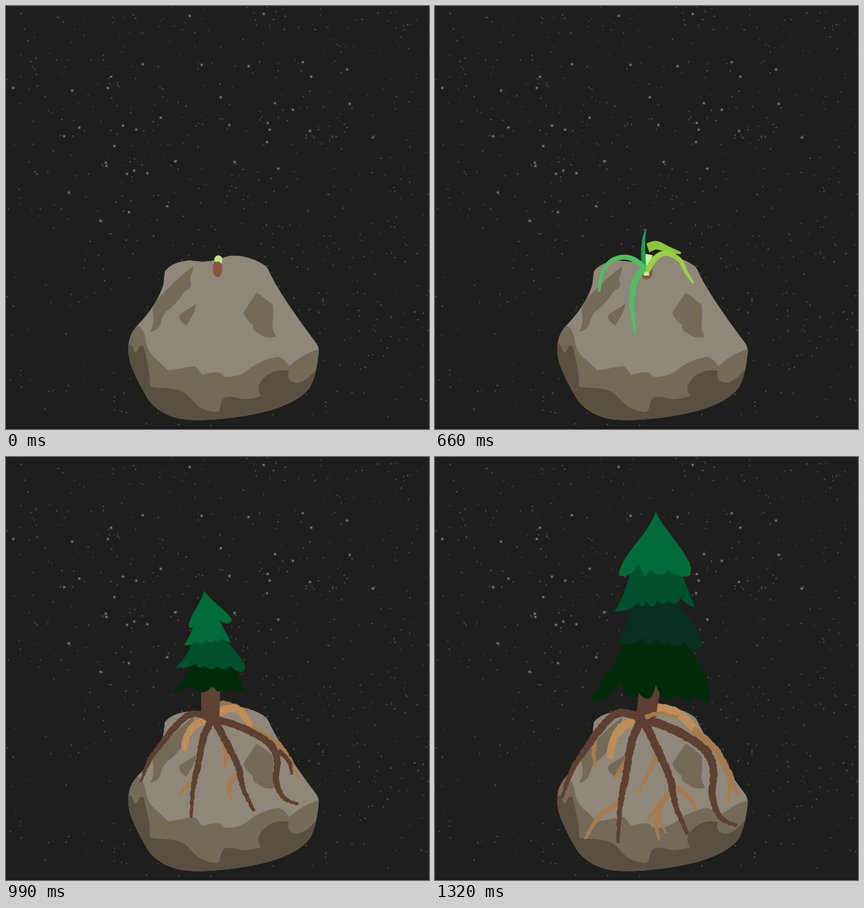
Write an HTML page with a canvas that moves like this. It is 640 px wide and 640 px high and loops after 2930 ms.

```html
<!DOCTYPE html>
<html lang="en">
<head>
<meta charset="utf-8">
<title>Tree growing on a rock</title>
<style>
html, body { margin: 0; height: 100%; overflow: hidden; background: #1e1e1d; }
canvas { display: block; width: 100vw; height: 100vh; }
</style>
</head>
<body>
<canvas id="stage" width="640" height="640"></canvas>
<script>
const stage = document.getElementById('stage');
const ctx = stage.getContext('2d');
const LOOP = 2930;

function seeded(seed) {
  return () => (seed = seed * 16807 % 2147483647) / 2147483647;
}

function fill(g, color, d) {
  g.fillStyle = color;
  g.fill(new Path2D(d));
}

// ---------- still backdrop ----------
const brightStars = [
  207,88, 100,128, 154,124, 159,107, 88,197, 111,184, 177,181, 197,187, 164,212, 151,237,
  152,242, 194,249, 214,253, 256,235, 183,254, 95,282, 143,325, 186,312, 244,303, 325,138,
  338,180, 346,236, 296,89, 367,91, 407,147, 434,157, 399,187, 395,206, 396,177, 460,189,
  449,85, 462,107, 516,96, 520,148, 555,199, 412,246, 390,12, 11,124, 234,169, 278,15
];

function dot(g, x, y, r, alpha) {
  g.fillStyle = `rgba(205,205,205,${alpha})`;
  g.beginPath();
  g.arc(x, y, r, 0, 7);
  g.fill();
}

function drawStars(g) {
  const rnd = seeded(4711);
  for (let i = 0; i < 900; i++) {
    const x = rnd() * 640, y = rnd() * 636;
    const light = rnd(), keep = rnd();
    const density = y > 500 ? .4 : x > 370 ? .95 : y < 340 ? .75 : .5;
    if (keep > density) continue;
    dot(g, x, y, 1.7, .03 + light * .08);
    dot(g, x, y, .9, .1 + light * .18);
  }
  for (let i = 0; i < brightStars.length; i += 2) {
    const x = brightStars[i], y = brightStars[i + 1];
    dot(g, x, y, 3.2, .07);
    dot(g, x, y, 2, .22);
    dot(g, x, y, 1.1, .5);
  }
}

function drawRock(g) {
  const outline = `M240 402C246 392 262 385 280 385C300 388 315 386 330 380
    C345 374 370 379 388 390C398 396 398 402 402 409C415 435 440 470 468 508
    C473 514 474 520 473 525C471 545 468 560 461 575C450 592 425 605 395 613
    C360 622 310 628 275 626C250 624 228 613 215 595C203 575 194 557 188 540
    C184 525 184 512 188 500C193 488 200 482 207 474C220 460 235 435 238 420Z`;
  const mid = '#736a58';
  g.save();
  g.clip(new Path2D(outline));
  fill(g, '#8f877a', outline);
  fill(g, mid, `M180 484L195 484C202 482 208 490 211 502C212 515 216 525 228 535
    C235 541 240 546 245 551C255 551 270 546 286 545C292 550 294 556 297 558
    C305 556 315 553 325 555C327 560 330 561 338 561C352 560 362 555 372 546
    C385 538 400 532 412 531C420 532 425 540 429 545C438 536 455 524 474 519L480 640H180Z`);
  fill(g, '#5a5042', `M180 513H185C189 510 192 515 193 521C195 526 199 525 201 517
    C204 512 208 513 209 518C212 530 214 540 216 550C218 560 217 570 219 576
    C235 579 255 577 268 584C280 592 285 605 302 611C312 615 320 615 323 612
    C325 603 326 594 332 592C340 590 350 593 358 595C370 595 380 592 386 590
    C378 580 382 570 393 560C405 551 415 550 428 552C425 562 428 569 440 570
    C450 569 460 561 470 549L480 640H180Z`);
  fill(g, mid, `M284 394C270 402 255 418 237 435C228 445 222 450 222 460
    C224 475 224 485 218 492C225 493 231 488 234 480C236 470 240 463 248 458
    C258 450 265 440 270 432C278 427 281 425 280 420C276 412 282 405 284 394Z`);
  fill(g, mid, `M288 450C280 458 262 464 262 470C262 476 268 480 273 484
    C278 474 286 465 288 450Z`);
  fill(g, mid, `M379 434C372 445 364 455 359 465C364 475 370 480 374 483
    C372 490 378 493 382 495C390 502 398 503 409 500C404 494 402 485 404 475
    C405 465 404 455 403 451C395 446 388 438 379 434Z`);
  g.restore();
}

const backdrop = document.createElement('canvas');
backdrop.width = backdrop.height = 640;
const back = backdrop.getContext('2d');
back.fillStyle = '#1e1e1d';
back.fillRect(0, 0, 640, 640);
drawStars(back);
back.fillStyle = '#1a1a19';
back.fillRect(0, 637, 640, 3);
drawRock(back);

// ---------- tapered leaves and roots ----------
function spline(a, b, c, d, t) {
  return b + .5 * t * (c - a + t * (2 * a - 5 * b + 4 * c - d + t * (3 * (b - c) + d - a)));
}

function limb(color, w0, w1, text, grow = 1, rough = 0) {
  const p = text.split(' ').map(s => s.split(',').map(Number));
  const last = p.length - 1, n = last * 14, rnd = seeded(97);
  const at = u => {
    const i = Math.min(last - 1, Math.floor(u * last)), t = u * last - i;
    const q = [p[Math.max(0, i - 1)], p[i], p[i + 1], p[Math.min(last, i + 2)]];
    return [0, 1].map(k => spline(q[0][k], q[1][k], q[2][k], q[3][k], t));
  };
  const left = [], right = [];
  for (let i = 0; i <= n; i++) {
    const u = i / n * grow, s = i / n;
    const [x, y] = at(u), [ax, ay] = at(Math.max(0, u - .01)), [bx, by] = at(Math.min(1, u + .01));
    const len = Math.hypot(bx - ax, by - ay) || 1;
    const nx = (ay - by) / len, ny = (bx - ax) / len;
    const w = (w0 + (w1 - w0) * s * s) / 2;
    const l = w + (rnd() - .5) * rough, r = w + (rnd() - .5) * rough;
    left.push([x + nx * l, y + ny * l]);
    right.unshift([x - nx * r, y - ny * r]);
  }
  ctx.fillStyle = color;
  ctx.beginPath();
  left.concat(right).forEach(v => ctx.lineTo(...v));
  ctx.fill();
}

const root = (color, w0, w1, text) => limb(color, w0, w1, text, 1, 1.8);
const shape = (color, d) => fill(ctx, color, d);

const LIME = '#9bd046', LEAF = '#8cc63f', PALE = '#cdeea0', GREEN = '#52bd63';
const TAN = '#bd8d5a', LIGHT = '#a67a4e', BROWN = '#8d643e', BARK = '#5d4031';
const FIR = ['#006b3a', '#004f2d', '#07301f', '#002a0a'];

// ---------- growth stages ----------
function seed() {
  shape('#8b5344', 'M313 396C313 388 317 385 321 385C326 386 328 392 327 400C326 407 323 411 319 410C315 409 313 404 313 396Z');
}

function nub() {
  seed();
  shape('#c0e68a', 'M315 384C316 378 320 376 324 378C328 380 328 386 326 390L321 386C319 388 316 388 315 384Z');
}

function husk() {
  shape('#8b5344', 'M312 402C312 393 318 389 323 391C330 394 331 404 327 410C323 415 315 415 313 409Z');
}

function sprout(grow = 1) {
  husk();
  limb(LEAF, 8, 7, '312,361 320,364 334,376', grow);
  limb(LIME, 8, 2, '318,402 304,381 288,373 276,381 268,396', grow);
  limb(LIME, 9, 2, '322,398 335,381 350,372 363,368', grow);
  limb('#3fae5c', 8, 7, '322,388 323,375 325,359', grow);
  limb(PALE, 8, 11, '320,408 320,398 322,385');
}

function leaves() {
  husk();
  limb(LEAF, 14, 3, '322,366 335,362 352,368 372,374');
  limb(PALE, 8, 11, '320,408 320,398 324,376');
  limb(LIME, 9, 3, '320,402 333,382 350,374 370,384 380,403 391,419');
  limb('#1f9d55', 7, 1, '316,396 315,372 316,352 319,337');
  limb(GREEN, 8, 4, '318,398 302,384 284,380 265,387 253,405 248,432');
  limb(GREEN, 10, 3, '317,396 303,415 298,440 299,465 303,496');
}

function sapling() {
  limb(LIME, 7, 3, '323,378 332,369 350,374 372,380');
  limb(PALE, 7, 4, '326,396 326,413');
  root(TAN, 12, 5, '318,398 330,383 350,377 366,390 380,416 418,431');
  root(TAN, 11, 4, '314,396 286,385 260,400 236,436 201,474');
  root(BROWN, 13, 3, '314,396 301,425 297,480 293,556');
  root(BROWN, 12, 5, '320,396 365,414 405,445 425,478 429,508');
  root(BARK, 13, 3, '317,390 322,430 343,470 359,516');
  shape(BARK, 'M311 362L316 355L324 362L323 400H312Z');
  shape('#004d2c', `M300 295L327 292C332 300 345 312 348 322C349 328 347 331 343 329
    C347 340 354 352 354 364C350 368 342 366 337 362C332 369 326 368 321 362
    C318 357 314 353 311 360C306 364 302 364 299 359C296 363 291 362 291 355
    C283 360 276 366 268 367C278 355 286 340 294 325C290 327 287 327 287 323
    C292 315 300 305 300 295Z`);
  shape(FIR[0], `M316 232C320 240 332 255 341 272C341 278 337 278 332 278
    C334 286 339 293 342 298C336 298 330 295 327 292C326 298 322 300 318 298
    C316 301 310 301 307 298C303 301 299 300 297 297C293 302 289 303 286 302
    C290 295 293 285 296 277C292 278 289 278 289 274C296 260 308 250 316 232Z`);
}

function darkRoots() {
  root(BARK, 13, 4, '312,394 280,387 256,404 228,442 207,475 192,516');
  root(BARK, 13, 4, '313,395 298,430 289,480 280,530 277,584');
  root(BARK, 13, 5, '314,396 334,437 355,485 365,530 383,571');
  root(BARK, 14, 5, '314,396 360,412 405,440 421,470 420,515 433,546 457,558');
}

function youngTree() {
  root('#9c7147', 16, 3, '314,385 328,370 346,372 372,382');
  root(TAN, 17, 10, '313,394 332,380 356,379 378,411');
  root(LIGHT, 10, 3, '376,412 418,439 440,468 459,514');
  root(TAN, 14, 8, '303,397 281,411 268,434 265,457');
  root(LIGHT, 9, 3, '334,448 335,474 331,494');
  root(LIGHT, 10, 4, '282,515 266,526 257,545');
  root(LIGHT, 11, 3, '354,500 341,523 344,551');
  darkRoots();
  root(BARK, 9, 4, '423,456 441,477 446,502');
  shape('#5d4334', 'M293 338L326 336L324 398L308 404L294 395Z');
  shape(FIR[3], `M274 292L345 290C352 312 362 328 368 346C360 347 350 342 344 337
    C342 346 334 348 328 342C323 348 318 345 313 332C308 340 304 346 300 345
    C297 348 293 346 290 343C284 346 280 342 278 332C270 338 258 346 246 346
    C258 330 272 310 274 292Z`);
  shape(FIR[1], `M278 248L333 243C345 262 362 280 367 294C369 302 366 309 358 307
    C350 306 346 300 343 296C338 304 328 304 320 297C316 305 306 305 300 295
    C296 302 288 302 285 292C277 298 262 300 250 300C262 288 275 270 278 248Z`);
  shape(FIR[0], `M299 154C308 172 335 190 344 206C347 212 342 217 335 216
    C332 216 328 213 325 211C331 226 339 240 344 252C338 251 332 248 329 243
    C327 250 322 252 317 247C312 255 305 253 302 247C298 257 290 257 287 249
    C282 255 273 258 264 257C272 247 276 235 280 223C275 226 272 224 273 218
    C278 195 292 180 299 154Z`);
}

function fullTree() {
  root(TAN, 15, 11, '334,380 358,384 378,396 398,418');
  root(LIGHT, 12, 3, '390,412 422,440 443,473 459,514');
  root(LIGHT, 9, 3, '432,458 446,488 443,525');
  root(TAN, 15, 8, '303,397 281,411 268,434 265,457');
  root(LIGHT, 8, 2, '243,423 240,450 245,475');
  root(LIGHT, 10, 3, '298,440 286,465 270,487');
  root(LIGHT, 8, 2, '336,450 322,480 306,511');
  root(LIGHT, 9, 4, '282,522 250,542 227,578');
  root(LIGHT, 10, 4, '360,502 341,526 320,550');
  root(LIGHT, 9, 3, '342,524 335,553 339,580');
  root(LIGHT, 6, 3, '338,545 344,558 350,570');
  root(LIGHT, 9, 3, '365,500 385,516 397,535');
  darkRoots();
  shape(BARK, 'M303 396C306 380 308 365 308 350L341 345C341 360 335 380 335 393L314 404Z');
  root(LIGHT, 7, 4, '318,394 340,388 368,394');
  shape(FIR[3], `M288 282L314 270L377 278C392 300 410 330 415 350C417 362 416 370 414 371
    C405 370 395 365 387 358C389 366 387 371 383 371C375 369 368 363 364 359
    C360 366 354 370 349 366C343 364 338 355 334 344C332 355 328 366 322 366
    C315 365 312 362 309 357C306 365 299 366 293 362C285 357 283 348 284 338
    C274 354 255 371 238 371C234 371 235 367 238 362C257 337 272 309 288 282Z`);
  shape(FIR[2], `M299 220L365 215C378 240 398 258 404 278C405 288 402 293 396 292
    C386 291 380 285 377 280C370 289 359 287 354 279C347 287 340 285 335 275
    C328 287 320 286 314 273C308 283 292 284 274 283C285 268 296 245 299 220Z`);
  shape(FIR[1], `M298 165L372 172C380 195 388 212 393 227C385 226 377 219 370 212
    C371 222 361 225 353 217C347 225 340 223 336 217C332 230 325 229 320 218
    C316 229 311 229 308 220C300 229 285 234 271 234C282 218 290 198 298 165Z`);
  shape(FIR[0], `M334 82C342 105 375 135 386 163C389 175 387 181 381 181
    C372 181 358 178 353 170C347 181 334 180 327 169L318 182L308 163
    C303 172 295 180 283 180C277 180 277 176 280 170C290 140 322 118 334 82Z`);
}

// Every stage first appears squashed toward the planting point, then at full size.
function squash(draw, sx = .9, sy = .8) {
  ctx.save();
  ctx.translate(310, 395);
  ctx.scale(sx, sy);
  ctx.translate(-310, -395);
  draw();
  ctx.restore();
}

const steps = [
  [0, nub],
  [110, () => { seed(); squash(() => sprout(.35), 1, .8); }],
  [220, () => sprout(.5)],
  [330, () => squash(sprout)],
  [440, sprout],
  [560, () => squash(leaves)],
  [660, leaves],
  [770, () => squash(sapling)],
  [880, sapling],
  [990, () => squash(youngTree)],
  [1100, youngTree],
  [1210, () => squash(fullTree)],
  [1320, fullTree]
];

const start = performance.now();
let shown = null;

function frame(now) {
  const t = Math.max(0, now - start) % LOOP;
  const step = steps.filter(s => s[0] <= t).pop();
  if (step !== shown) {
    shown = step;
    ctx.drawImage(backdrop, 0, 0);
    step[1]();
  }
  requestAnimationFrame(frame);
}
frame(start);
</script>
</body>
</html>
```
